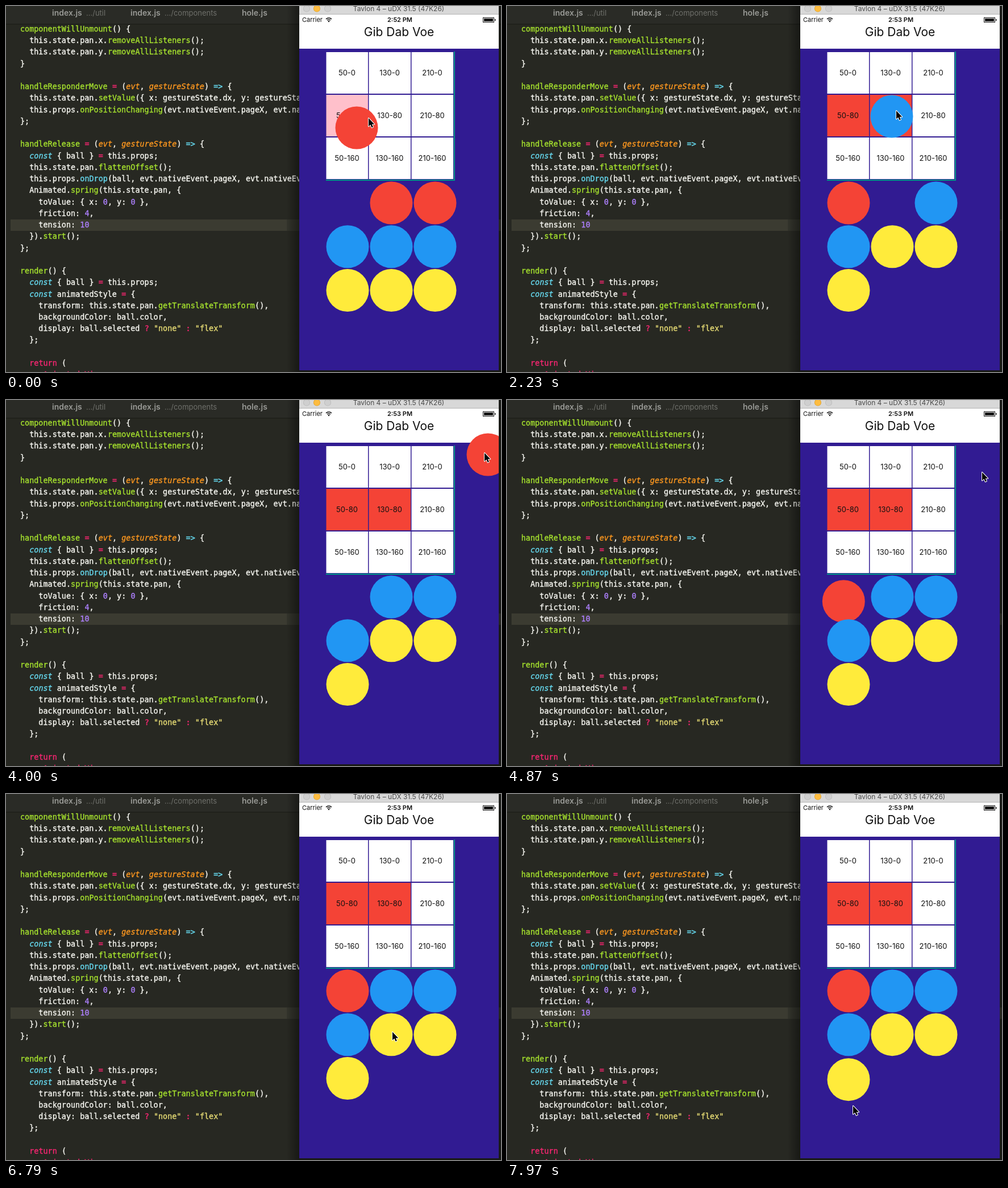
Animation, 871 px wide and 643 px high, one loop 8000 ms. Source, as an HTML page with a canvas:

```html
<!DOCTYPE html>
<html lang="en">
<head>
<meta charset="utf-8">
<title>Drag and drop demo</title>
<style>
  html, body { margin: 0; width: 100%; height: 100%; overflow: hidden; background: #272822; }
  canvas { display: block; }
</style>
</head>
<body>
<canvas id="stage" width="871" height="643"></canvas>
<script>
const ctx = document.getElementById("stage").getContext("2d");
const LOOP = 8000, STEP = 147.5;
const UI = "Inter, Roboto, sans-serif";
const MONO = '"DejaVu Sans Mono", monospace';
const C = {
  white: "#f8f8f2", green: "#a6e22e", pink: "#f92672", cyan: "#66d9ef",
  orange: "#fd971f", violet: "#ae81ff", yellow: "#e6db74"
};
const PAINT = { R: "#f44336", B: "#2196f3", Y: "#ffeb3b" };
const BALLS = "RRRBBBYYY", RADIUS = 37.5;

const CODE = `componentWillUnmount() {
  this.state.pan.x.removeAllListeners();
  this.state.pan.y.removeAllListeners();
}

handleResponderMove = (evt, gestureState) => {
  this.state.pan.setValue({ x: gestureState.dx, y: gestureState.dy });
  this.props.onPositionChanging(evt.nativeEvent.pageX, evt.nativeEvent.pageY);
};

handleRelease = (evt, gestureState) => {
  const { ball } = this.props;
  this.state.pan.flattenOffset();
  this.props.onDrop(ball, evt.nativeEvent.pageX, evt.nativeEvent.pageY);
  Animated.spring(this.state.pan, {
    toValue: { x: 0, y: 0 },
    friction: 4,
    tension: 10
  }).start();
};

render() {
  const { ball } = this.props;
  const animatedStyle = {
    transform: this.state.pan.getTranslateTransform(),
    backgroundColor: ball.color,
    display: ball.selected ? "none" : "flex"
  };

  return (
    <Animated.View`.split("\n");

// Pointer way points: step, x, y
const PATH = [
  [0, 638, 197], [2, 668, 172], [3, 672, 170], [4, 668, 180], [5, 630, 290],
  [6, 605, 348], [7, 605, 225], [8, 605, 198], [9, 605, 200], [11, 686, 336],
  [12, 686, 336], [13, 686, 320], [15, 685, 184], [16, 600, 90], [17, 525, 5],
  [18, 686, 226], [20, 680, 182], [21, 650, 205], [22, 610, 300], [23, 594, 375],
  [24, 595, 343], [25, 595, 343], [27, 842, 93], [28, 850, 112], [29, 830, 140],
  [31, 836, 130], [33, 836, 127], [36, 860, 330], [41, 856, 594], [42, 850, 611],
  [44, 765, 505], [46, 680, 418], [47, 666, 350], [47.7, 660, 308], [49, 665, 385],
  [50, 650, 440], [51, 612, 498], [52, 609, 500], [53, 609, 578], [54, 609, 548]
];

// hold/free in steps; cell marks a successful drop, otherwise the ball springs home
const DRAGS = [
  { slot: 0, hold: -1, free: 4, grip: [622, 329], cell: 4 },
  { slot: 0, hold: 6, free: 9, grip: [605, 348], cell: 3 },
  { slot: 1, hold: 12, free: 18.1, grip: [686, 336] },
  { slot: 0, hold: 25, free: 31.2, grip: [595, 343] },
  { slot: 4, hold: 46, free: 47.75, grip: [680, 418] },
  { slot: 6, hold: 52, free: 53.001, grip: [609, 500], delay: 0.4 }
];

function pointer(n) {
  const i = PATH.findIndex(p => p[0] >= n);
  if (i <= 0) return PATH[i ? PATH.length - 1 : 0].slice(1);
  const a = PATH[i - 1], b = PATH[i], k = (n - a[0]) / (b[0] - a[0]);
  return [a[1] + (b[1] - a[1]) * k, a[2] + (b[2] - a[2]) * k];
}

// Damped spring for friction 4, tension 10
function spring(sec) {
  if (sec <= 0) return 1;
  const decay = 6.5, w = 8.91;
  return Math.exp(-decay * sec) * (Math.cos(w * sec) + decay / w * Math.sin(w * sec));
}

function offset(d, n) {
  if (n < d.hold || (d.cell !== undefined && n >= d.free)) return [0, 0];
  const p = pointer(Math.min(n, d.free));
  const wait = d.delay || 0;
  const k = n <= d.free ? 1 : spring((n - d.free - wait) * STEP / 1000 + (wait ? 0.147 : 0));
  return [(p[0] - d.grip[0]) * k, (p[1] - d.grip[1]) * k];
}

function rect(x, y, w, h, color) {
  ctx.fillStyle = color;
  ctx.fillRect(x, y, w, h);
}

function disc(x, y, r, color) {
  ctx.fillStyle = color;
  ctx.beginPath();
  ctx.arc(x, y, r, 0, Math.PI * 2);
  ctx.fill();
}

function text(str, x, y, font, color, align = "left") {
  ctx.font = font;
  ctx.fillStyle = color;
  ctx.textAlign = align;
  ctx.fillText(str, x, y);
}

const TOKEN = /"[^"]*"|=>|\bconst\b|\breturn\b|<[\w.]+|\w+(?=\(| = \()|\b\d+\b|\bevt\b|\bgestureState\b|[=?]| :/g;

function style(tok, line) {
  if (tok[0] === '"') return C.yellow;
  if (/^(=>|const|onDrop)$/.test(tok)) return C.cyan;
  if (/^(return|=|\?| :|<.*)$/.test(tok)) return C.pink;
  if (/^\d+$/.test(tok)) return C.violet;
  if (/^(evt|gestureState)$/.test(tok)) return line.includes("=>") ? C.orange : C.white;
  return C.green;
}

function codeLine(line, y) {
  const put = (str, col, color) => {
    const slant = color === C.orange || str === "const" ? "italic " : "";
    const x = 25 + col * 8.1;
    text(str, x, y, `${slant}13.45px ${MONO}`, color);
    ctx.strokeStyle = color;
    ctx.lineWidth = 0.35;
    ctx.strokeText(str, x, y);
  };
  let end = 0;
  for (const m of line.matchAll(TOKEN)) {
    put(line.slice(end, m.index), end, C.white);
    put(m[0], m.index, style(m[0], line));
    end = m.index + m[0].length;
  }
  put(line.slice(end), end, C.white);
}

function editor() {
  rect(0, 0, 871, 643, "#272822");
  rect(0, 0, 871, 31, "#2a2b26");
  rect(0, 31, 871, 2, "#20211c");
  rect(8, 375, 863, 20, "#3b3b31");
  rect(494, 375, 22, 20, "#32332b");
  const tab = (x, name, dir, dx) => {
    text(name, x, 17, `600 14px ${UI}`, "#999a96");
    if (dir) text(dir, dx, 17, `13px ${UI}`, "#6f706b");
  };
  tab(81, "index.js", ".../util", 141);
  tab(219, "index.js", ".../components", 279);
  tab(415, "hole.js");
  CODE.forEach((line, i) => codeLine(line, 45 + i * 20.24));
  const shade = ctx.createLinearGradient(494, 0, 516, 0);
  shade.addColorStop(0, "rgba(0,0,0,0)");
  shade.addColorStop(1, "rgba(0,0,0,.4)");
  rect(494, 0, 22, 643, shade);
  rect(867, 0, 4, 643, "rgba(0,0,0,.35)");
  rect(516, 640, 351, 3, "#191a17");
}

function statusBar(clock) {
  text("Carrier", 521, 28, `11px ${UI}`, "#111");
  text(clock, 693, 28, `600 11px ${UI}`, "#111", "center");
  ctx.strokeStyle = "#111";
  ctx.lineWidth = 1.6;
  for (const r of [4, 7]) {
    ctx.beginPath();
    ctx.arc(568, 28, r, -Math.PI * 0.75, -Math.PI * 0.25);
    ctx.stroke();
  }
  disc(568, 27, 1.3, "#111");
  ctx.lineWidth = 1;
  ctx.strokeRect(839.5, 20.5, 19, 8);
  rect(841, 22, 16, 5, "#111");
  rect(860, 23, 1.5, 3, "#111");
}

function board(n) {
  const tint = {};
  const held = DRAGS.find(d => n >= d.hold && n < d.free);
  if (held) {
    const p = pointer(n - 0.3);
    const col = Math.floor((p[0] - 564) / 75), row = Math.floor((p[1] - 80) / 75);
    if (col >= 0 && col < 3 && row >= 0 && row < 3) tint[row * 3 + col] = "#ffc0cb";
  }
  for (const d of DRAGS) if (d.cell !== undefined && n >= d.free) tint[d.cell] = PAINT.R;

  rect(563, 80, 227, 227, "#009688");
  rect(563, 80, 225, 225, "#311b92");
  for (let i = 0; i < 9; i++) {
    const col = i % 3, row = Math.floor(i / 3);
    rect(563.5 + col * 75, 81 + row * 75, 73.5, 73, tint[i] || "#fff");
    text(`${50 + col * 80}-${row * 80}`, 600 + col * 75, 122 + row * 75, `13px ${UI}`, "#111", "center");
  }
}

function balls(n) {
  const used = DRAGS.filter(d => d.cell !== undefined && n >= d.free).length;
  const live = DRAGS.filter(d => d.cell === undefined || n < d.free);
  [...BALLS.slice(used)].forEach((kind, i) => {
    let x = 601 + (i % 3) * 77, y = 346 + Math.floor(i / 3) * 76.75;
    for (const d of live) {
      if (d.slot !== i || n < d.hold) continue;
      const o = offset(d, n);
      x += o[0];
      y += o[1];
    }
    disc(x, y, RADIUS, PAINT[kind]);
  });
}

function phone(n) {
  rect(516, 0, 351, 14, "#d8d8d8");
  rect(516, 14, 351, 1, "#b4b4b4");
  [[529, "#cfcfcf"], [547, "#fdbc40"], [566, "#cfcfcf"]].forEach(([x, color]) => {
    disc(x, 4.5, 6, color === "#fdbc40" ? "#dfa023" : "#b8b8b8");
    disc(x, 4.5, 5.2, color);
  });
  text("Tavlon 4 – uDX 31.5 (47K26)", 691, 9, `12px ${UI}`, "#4a4a4a", "center");

  ctx.save();
  ctx.beginPath();
  ctx.rect(516, 15, 351, 625);
  ctx.clip();
  rect(516, 15, 351, 60, "#fff");
  rect(516, 75, 351, 565, "#311b92");
  statusBar(n < 10 ? "2:52 PM" : "2:53 PM");
  text("Gib Dab Voe", 691.5, 53, `21px ${UI}`, "#111", "center");
  board(n);
  balls(n);
  ctx.restore();
}

const ARROW = new Path2D("M0 0V14.5L3.3 11.5L5.6 16.6L7.9 15.6L5.7 10.7H10.2Z");

function arrow([x, y]) {
  ctx.save();
  ctx.translate(x, y);
  ctx.strokeStyle = "#fff";
  ctx.lineWidth = 2;
  ctx.lineJoin = "round";
  ctx.stroke(ARROW);
  ctx.fillStyle = "#000";
  ctx.fill(ARROW);
  ctx.restore();
}

function draw(ms) {
  const n = Math.floor((ms % LOOP) / STEP);
  editor();
  phone(n);
  arrow(pointer(n));
}

const start = performance.now();
function tick() {
  draw(performance.now() - start);
  requestAnimationFrame(tick);
}
tick();
</script>
</body>
</html>
```
